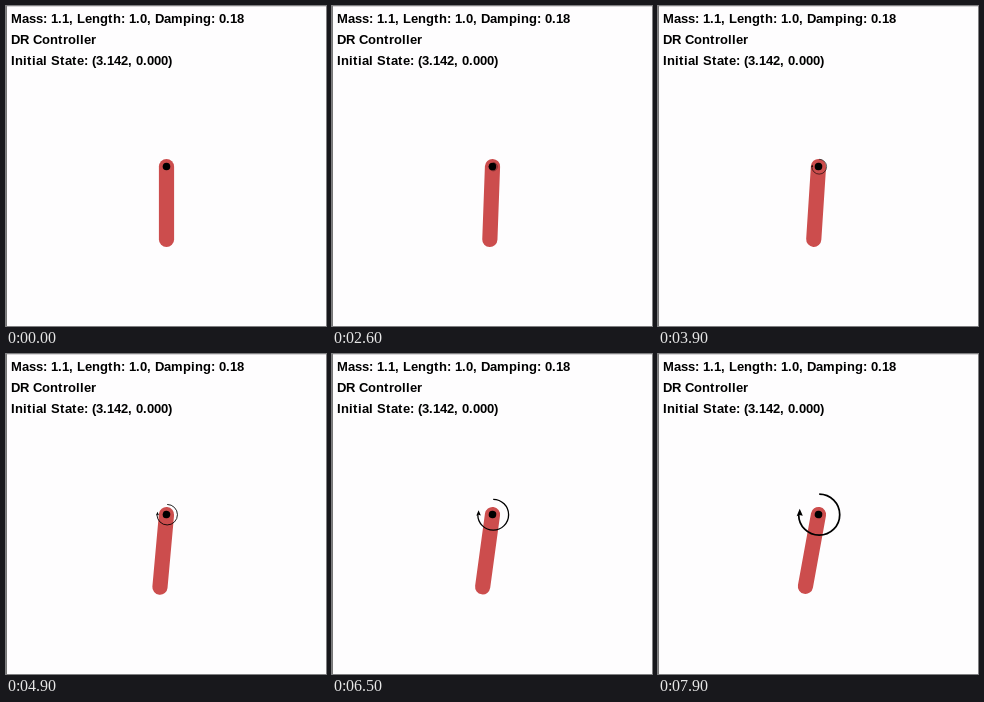
An HTML page with a canvas for the animation above (8 s loop, 320 by 320 pixels).

```html
<!DOCTYPE html>
<html lang="en">
<head>
<meta charset="utf-8">
<title>Pendulum</title>
<style>
  html, body { margin: 0; width: 100%; height: 100%; overflow: hidden; background: #fefdfe; }
  canvas { display: block; width: 100vw; height: 100vh; }
</style>
</head>
<body>
<canvas id="stage" width="320" height="320"></canvas>
<script>
const LOOP = 8000, STEP = 100, START = 800;
const PIVOT = 160.5, ROD_LENGTH = 73, ROD_WIDTH = 15.2;
const LABELS = [
  'Mass: 1.1, Length: 1.0, Damping: 0.18',
  'DR Controller',
  'Initial State: (3.142, 0.000)'
];
const ctx = document.getElementById('stage').getContext('2d');

// Radians from hanging straight down, gently accelerating after the start.
function tiltAt(t) {
  const s = (t - START) / 1000;
  return s < 0 ? 0 : .004 + .0157 * s + .00128 * s * s;
}

// Signed arrow radius: a kick and a brake, then a push that holds the tilt.
function torqueAt(t) {
  if (t === START) return 21;
  if (t === START + STEP) return -19;
  return 114 * tiltAt(t);
}

function fillRect(color, width, height) {
  ctx.fillStyle = color;
  ctx.fillRect(0, 0, width, height);
}

// Each glyph advances by whole pixels; the hinted "t" is one pixel wider.
function drawLabel(text, y) {
  let x = 5;
  for (const char of text) {
    ctx.fillText(char, x, y);
    x += Math.round(ctx.measureText(char).width) + (char === 't');
  }
}

function drawRod(tilt) {
  ctx.save();
  ctx.translate(PIVOT, PIVOT);
  ctx.rotate(tilt);
  ctx.beginPath();
  ctx.moveTo(0, 0);
  ctx.lineTo(0, ROD_LENGTH);
  ctx.strokeStyle = '#cc4d4d';
  ctx.lineWidth = ROD_WIDTH;
  ctx.lineCap = 'round';
  ctx.stroke();
  ctx.beginPath();
  ctx.arc(0, 0, 3.8, 0, 2 * Math.PI);
  ctx.fill();
  ctx.restore();
}

function drawTorque(size) {
  ctx.save();
  ctx.translate(161.2, 160.7);
  ctx.scale(size, Math.abs(size));
  ctx.beginPath();
  ctx.arc(0, 0, 1, -Math.PI / 2, Math.PI);
  ctx.lineWidth = .085;
  ctx.stroke();
  ctx.beginPath();
  ctx.moveTo(-.95, -.29);
  ctx.lineTo(-1.1, .07);
  ctx.lineTo(-.97, .01);
  ctx.lineTo(-.8, .05);
  ctx.fill();
  ctx.restore();
}

function draw() {
  const t = Math.floor(performance.now() % LOOP / STEP) * STEP;
  const size = torqueAt(t);
  fillRect('#fefdfe', 320, 320);
  fillRect('#d8d6d8', 320, 1);
  fillRect('#777', 1, 320);
  ctx.fillStyle = '#000';
  ctx.font = 'bold 13px "Liberation Sans", Arial, sans-serif';
  LABELS.forEach((text, i) => drawLabel(text, 17 + 21 * i));
  drawRod(tiltAt(t));
  if (size) drawTorque(size);
  requestAnimationFrame(draw);
}
draw();
</script>
</body>
</html>
```
